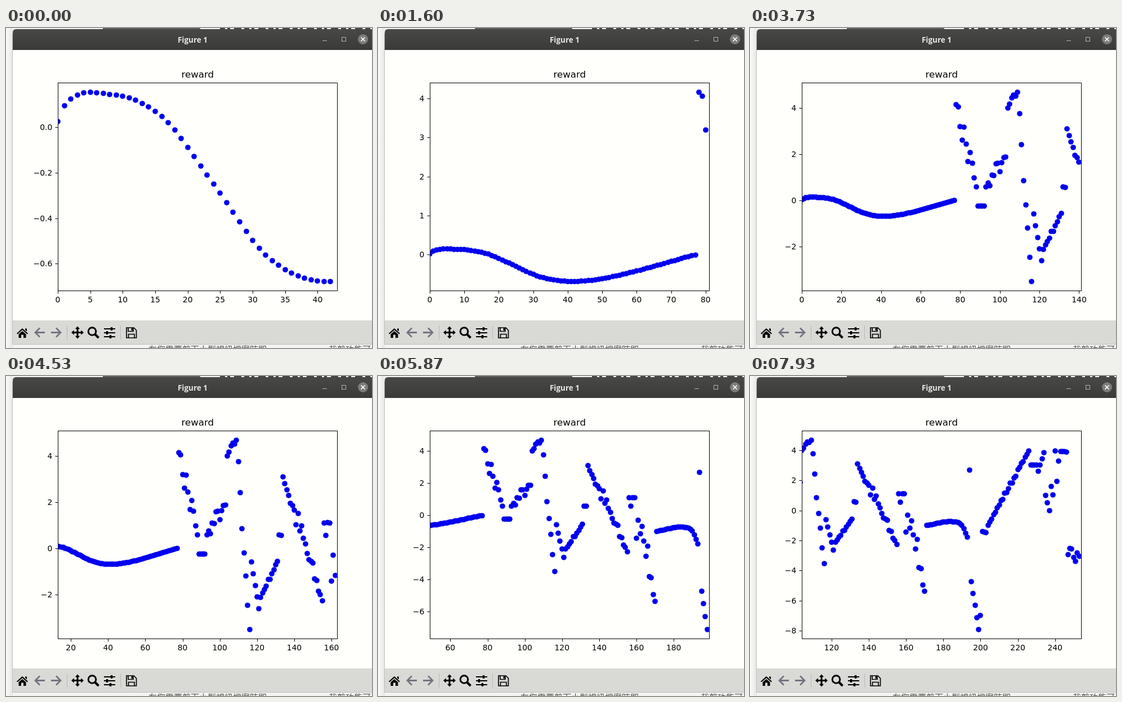
Write an HTML page that moves like this. It is 650x568 px and loops after 8000 ms.

```html
<!DOCTYPE html>
<html lang="en">
<head>
<meta charset="utf-8">
<title>Reward plot</title>
<style>
  html, body { margin: 0; width: 100%; height: 100%; overflow: hidden; background: #f4f4f2; }
  svg { display: block; width: 650px; height: 568px; }
  .plot { font: 13.89px "DejaVu Sans", sans-serif; }
  .page { font: 15px "Noto Sans CJK TC", "Noto Sans CJK", sans-serif; fill: #555552; }
  .line { fill: none; stroke: #000; }
</style>
</head>
<body>
<svg viewBox="0 0 650 568">
  <defs>
    <linearGradient id="bar" x2="0" y2="1">
      <stop offset="0" stop-color="#484846"/><stop offset="1" stop-color="#3a3a38"/>
    </linearGradient>
    <linearGradient id="shade">
      <stop offset="0" stop-color="#fafaf8"/><stop offset="1" stop-color="#e6e6e4"/>
    </linearGradient>
    <clipPath id="axes"><rect x="92" y="97" width="497" height="370"/></clipPath>
  </defs>

  <!-- page behind the window -->
  <rect width="12" height="568" fill="url(#shade)"/>
  <path d="M172 0H345V2H172Z" fill="#5f5f5a"/>
  <path d="M380 1H650" stroke="#45453f" stroke-width="2" stroke-dasharray="9 4 5 7 13 5"/>
  <text class="page" x="253" y="576">在您需要剪下小型視訊檔案時即</text>
  <text class="page" x="573" y="576">裁剪功能可以</text>

  <!-- window -->
  <path d="M12 39V8Q12 2 18 2H650V39Z" fill="url(#bar)"/>
  <rect x="12" y="39" width="638" height="480" fill="#fffffb"/>
  <rect x="12" y="519" width="638" height="43" fill="#d9d9d6"/>
  <path d="M11.5 10V561.5H650" fill="none" stroke="#bdbdba"/>
  <text x="331.5" y="26" text-anchor="middle" font-family="'Open Sans', 'Noto Sans', sans-serif"
        font-size="13.5" font-weight="700" fill="#e8e8e4">Figure 1</text>
  <g fill="none" stroke="#b4b4b0">
    <path d="M562 22.5H570"/>
    <rect x="596.5" y="16.5" width="7" height="7"/>
    <circle cx="634" cy="20" r="9" fill="#7c7c79" stroke="none"/>
    <path d="M630.5 16.5l7 7m0-7l-7 7" stroke="#fff" stroke-width="1.7"/>
  </g>

  <!-- toolbar -->
  <path d="M19 542L29 533 39 542 37.6 543.5 29 536 20.4 543.5ZM34 533.5h3v5l-3-2.5ZM22.5 543.5L29 538 35.5 543.5V550H31V544.5H27V550H22.5Z"/>
  <g fill="none" stroke="#747480" stroke-width="2.8">
    <path d="M52 540.5H69M60 532.5L52 540.5 60 548.5"/>
    <path d="M80 540.5H97M89 532.5L97 540.5 89 548.5"/>
  </g>
  <path d="M108.5 528V553M203.5 528V553" stroke="#b8b8b5"/>
  <path d="M127 529.5l4.2 4.7h-2.7v4.8h4.8v-2.7l4.7 4.2-4.7 4.2v-2.7h-4.8v4.8h2.7l-4.2 4.7-4.2-4.7h2.7v-4.8h-4.8v2.7l-4.7-4.2 4.7-4.2v2.7h4.8v-4.8h-2.7Z"/>
  <g class="line">
    <circle cx="153" cy="538.5" r="6.8" stroke-width="3"/>
    <path d="M158 543.5L164.5 550" stroke-width="4"/>
    <path d="M174 534H194M174 541H194M174 548H194" stroke-width="1.8"/>
    <path d="M187.5 531V537M179.5 538V544M185.5 545V551" stroke-width="3.4"/>
    <path d="M214 532H227L231.5 536.5V550H214ZM217 532V538.5H226V532M217.5 550V543.5H228V550" stroke-width="1.7"/>
    <path d="M223.8 533V537" stroke-width="2.4"/>
  </g>

  <g class="plot">
    <text x="340.3" y="88" text-anchor="middle" font-size="16.67">reward</text>
    <g id="dots" clip-path="url(#axes)" fill="#0000ee"></g>
    <rect class="line" x="92.5" y="97.5" width="496" height="369"/>
    <g id="ticks"></g>
  </g>
</svg>
<script>
const LEFT = 92, WIDTH = 496, BOTTOM = 466.7, HEIGHT = 369.6;
const rewards = [];

let seed = 7;
const random = () => (seed = seed * 16807 % 2147483647) / 2147483647;

// Smooth curve through a few [index, value] knots.
function addCurve(knots) {
  const slope = i => (knots[i + 1][1] - knots[i][1]) / (knots[i + 1][0] - knots[i][0]);
  const tangent = i => i === 0 ? slope(0) : i === knots.length - 1 ? slope(i - 1)
                                          : (slope(i - 1) + slope(i)) / 2;
  for (let i = 0; i < knots.length - 1; i++) {
    const [x0, y0] = knots[i], [x1, y1] = knots[i + 1], w = x1 - x0;
    for (let x = x0; x <= x1; x++) {
      const s = (x - x0) / w, r = 1 - s;
      rewards[x] = y0 * (1 + 2 * s) * r * r + y1 * s * s * (3 - 2 * s)
                 + w * s * r * (tangent(i) * r - tangent(i + 1) * s);
    }
  }
}

// Straight run with random scatter that fades out at both ends.
function addRun(count, from, to, scatter = 0) {
  for (let i = 0; i < count; i++) {
    const s = count > 1 ? i / (count - 1) : 0;
    rewards.push(from + (to - from) * s + scatter * (2 * random() - 1) * Math.sin(Math.PI * s));
  }
}

// Balanced start
addCurve([[0, .027], [1, .095], [8, .146], [16, .049], [24, -.249], [32, -.56], [40, -.675],
  [50, -.605], [77, .005]]);

// Exploration
addRun(11, 4.17, .6, 1);
addRun(4, -.22, -.22);
addRun(11, .6, 1.9, .4);
addRun(6, 4.02, 4.7, .2);
addRun(7, 3.78, -3.5, .8);
addRun(5, -.58, -2.6);
addRun(10, -2.1, -.54, .1);
addRun(2, .6, .58);
addRun(22, 3.11, -2.26, .6);
addRun(7, 1.12, -1.15, 1.5);
addRun(8, -.68, -5.36, .8);

// Steady phase and fall
addCurve([[171, -.98], [186, -.74], [190, -.97], [193, -1.77]]);
addRun(1, 2.69, 2.69);
addRun(5, -4.71, -7.9);
addRun(1, -6.97, -6.97);

// Recovery
addRun(3, -1.37, -1.45);
addRun(23, -.96, 4, .15);
addRun(4, 3.06, 3.06);
addRun(4, 2.65, 3.88);
addRun(3, 1.03, .02);
addRun(5, 1.62, 3.32, 1.8);
addRun(4, 3.96, 3.92);
addRun(7, -2.9, -3.03, .9);

// [step, newest index]: a slow start, a short catch-up, then a constant rate
const pace = [[0, 42], [24, 80], [43, 117], [119, 253]];
function newestAt(step) {
  const i = Math.max(1, pace.findIndex(p => p[0] >= step));
  const [s0, n0] = pace[i - 1], [s1, n1] = pace[i];
  return Math.round(n0 + (n1 - n0) * (step - s0) / (s1 - s0));
}

function ticksIn(lo, hi) {
  const raw = (hi - lo) / 9, mag = 10 ** Math.floor(Math.log10(raw));
  const size = mag * [1, 2, 2.5, 5, 10].find(m => m * mag >= raw - 1e-9);
  const list = [];
  for (let i = Math.ceil(lo / size); i * size <= hi + 1e-9; i++) {
    const text = Math.abs(i * size).toFixed(size < 1 ? 1 : 0);
    list.push({ value: i * size, label: (i < 0 ? "\u2212" : "") + text });
  }
  return list;
}

const dots = document.getElementById("dots"), ticks = document.getElementById("ticks");

function draw(newest) {
  const x0 = Math.max(0, newest - 149), x1 = newest + 1;
  const seen = rewards.slice(0, newest + 1);
  const low = Math.min(...seen), high = Math.max(...seen), margin = (high - low) * .05;
  const y0 = low - margin, y1 = high + margin;
  const px = x => LEFT + (x - x0) / (x1 - x0) * WIDTH;
  const py = y => BOTTOM - (y - y0) / (y1 - y0) * HEIGHT;

  dots.innerHTML = seen.map((y, x) => x < x0 - 2 ? "" :
    `<circle cx="${Math.round(px(x))}" cy="${Math.round(py(y))}" r="4.86"/>`).join("");
  ticks.innerHTML =
    ticksIn(x0, x1).map(t => `<path class="line" d="M${Math.round(px(t.value)) + .5} 467v4.5"/>
      <text x="${px(t.value)}" y="487" text-anchor="middle">${t.label}</text>`).join("") +
    ticksIn(y0, y1).map(t => `<path class="line" d="M92 ${Math.floor(py(t.value)) + .5}h-4.5"/>
      <text x="82.3" y="${Math.floor(py(t.value)) + 5}" text-anchor="end">${t.label}</text>`).join("");
}

let shown = -1;
const begin = performance.now();
function tick() {
  const time = (performance.now() - begin) % 8000;
  const step = Math.min(119, Math.floor((time + 3.4) * .015));
  if (step !== shown) draw(newestAt(shown = step));
  requestAnimationFrame(tick);
}
tick();
</script>
</body>
</html>
```
